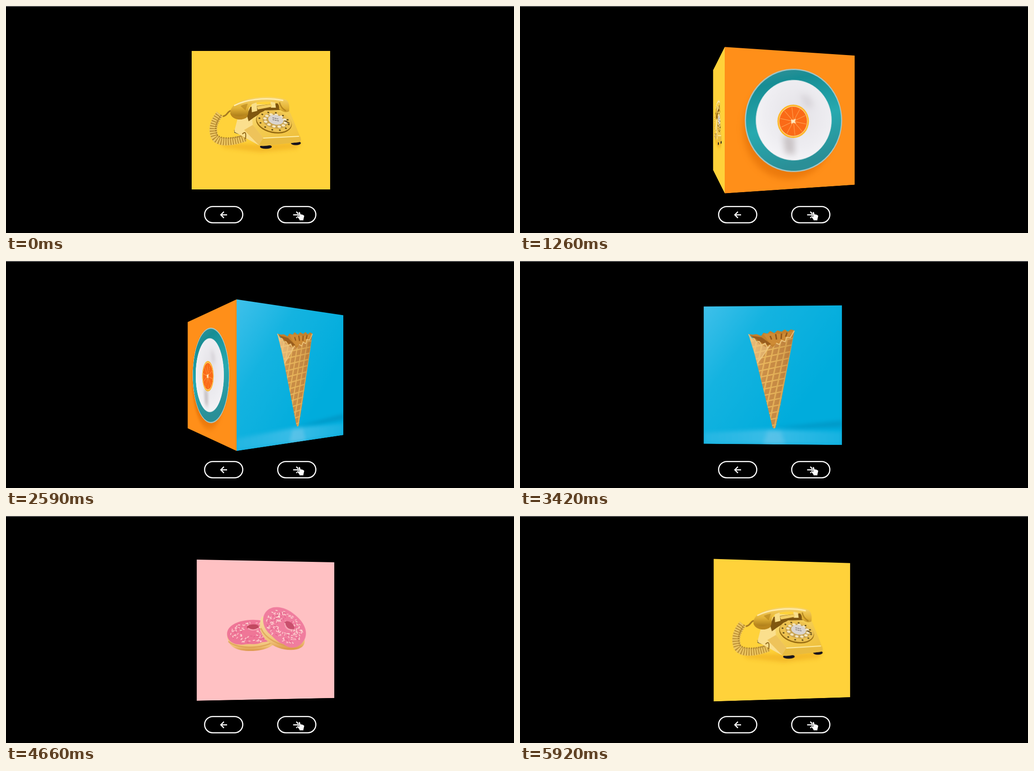
Animation, 1119 px wide and 500 px high, one loop 5.96 s. Source, as an HTML page:

```html
<!DOCTYPE html>
<html lang="en">
<head>
<meta charset="utf-8">
<title>Cube carousel</title>
<style>
  html, body { margin: 0; width: 100%; height: 100%; overflow: hidden; background: #000; }
  .stage { position: absolute; left: 0; top: 0; width: 1119px; height: 500px; overflow: hidden; }
  .topline { position: absolute; left: 0; top: 0; width: 100%; height: 1px; background: #a9a9ab; }
  .scene { position: absolute; left: 408.5px; top: 99px; width: 305px; height: 305px; perspective: 664px; }
  .cube { position: absolute; inset: 0; transform-style: preserve-3d; transform: translateZ(-152.5px); }
  .face { position: absolute; left: 0; top: 0; width: 305px; height: 305px; display: block;
    backface-visibility: hidden; transform: rotateY(calc(var(--i) * 90deg)) translateZ(152.5px); }
  .controls { position: absolute; left: 0; top: 0; }
</style>
</head>
<body>
<div class="stage">
  <div class="topline"></div>
  <div class="scene">
    <div class="cube" id="cube">

      <!-- Telephone -->
      <svg class="face" style="--i:0" viewBox="408.5 99 305 305">
        <defs>
          <linearGradient id="shell" x1="0" y1="0" x2="1" y2="1">
            <stop offset="0" stop-color="#ffe9a0"/><stop offset=".45" stop-color="#f4cd54"/><stop offset="1" stop-color="#eebc36"/>
          </linearGradient>
          <linearGradient id="grip" x1="0" y1="0" x2="0" y2="1">
            <stop offset="0" stop-color="#f9d66b"/><stop offset=".5" stop-color="#e3b235"/><stop offset="1" stop-color="#98690f"/>
          </linearGradient>
          <filter id="soft" x="-30%" y="-80%" width="160%" height="260%"><feGaussianBlur stdDeviation="5"/></filter>
        </defs>
        <rect x="408" y="98" width="306" height="307" fill="#ffd23a"/>
        <path d="M470 302L540 304L650 300L640 314L560 322L480 312Z" fill="#eda91d" opacity=".6" filter="url(#soft)"/>
        <g fill="none">
          <path d="M495 231C487 231 488 242 477 243" stroke="#a77a20" stroke-width="3.5"/>
          <path d="M470 238C456 256 453 272 459 288C468 304 499 300 527 290" stroke="#b4862b" stroke-width="16"/>
          <path d="M470 238C456 256 453 272 459 288C468 304 499 300 527 290" stroke="#edc762" stroke-width="17" stroke-dasharray="3.4 1.8"/>
          <path d="M474 240C461 257 459 271 464 283C472 294 499 292 523 285" stroke="#8f671b" stroke-width="3" stroke-dasharray="2.6 2.6" opacity=".7"/>
        </g>
        <g fill="#17131c">
          <path d="M502 273L514 277V283L503 279Z"/>
          <ellipse cx="572" cy="310" rx="13" ry="4.5"/>
          <ellipse cx="638" cy="302" rx="11" ry="4.5"/>
        </g>
        <path d="M511 243L503 274Q502 278 508 280L557 307Q562 309 570 308L644 300Q650 299 649 292L627 238Q620 222 600 218L545 216Z" fill="url(#shell)"/>
        <path d="M511 243L503 274Q502 278 508 280L557 307L566 290L543 262L540 228Z" fill="#fbdf8d"/>
        <path d="M524 273L557 307L566 290L543 262Z" fill="#e6b13a" opacity=".6"/>
        <path d="M566 291L648 288L649 295Q648 299 644 300L568 308Q562 308 557 306Z" fill="#e9bb3e"/>
        <path d="M566 291L645 287" stroke="#fff0ae" stroke-width="2"/>
        <path d="M520 282Q530 272 527 293" fill="none" stroke="#8a6112" stroke-width="2"/>
        <path d="M530 240L538 222L598 214L606 229L570 230L545 246L534 254Z" fill="#80570f"/>
        <path d="M540 213L551 211L553 231L541 234Z M582 209L592 210L594 224L583 224Z" fill="#f9df8a"/>
        <path d="M552 221L584 216L585 222L554 228Z" fill="#f3ce62"/>
        <g transform="rotate(12 590 254)">
          <ellipse cx="590" cy="256" rx="40" ry="24" fill="#946910"/>
          <ellipse cx="590" cy="254" rx="39" ry="23" fill="#edc250"/>
          <ellipse cx="592" cy="253" rx="28" ry="16" fill="#c9a24d"/>
          <g id="dial"></g>
          <ellipse cx="593" cy="250" rx="17" ry="10.5" fill="#d9d4cf"/>
          <path d="M585 247h13M586 251h15" stroke="#817b78" stroke-width="1.6" stroke-dasharray="4 1"/>
          <path d="M612 248L624 251" stroke="#58431b" stroke-width="2"/>
        </g>
        <path d="M494 238C491 221 510 210 536 204C562 199 592 199 613 205C623 208 625 220 623 232Q613 237 601 227C602 216 598 213 589 212C570 209 551 211 540 217C530 223 536 238 530 245C519 253 499 251 494 238Z" fill="url(#grip)"/>
        <path d="M494 236C505 245 519 244 531 237L529 246C518 253 499 251 494 238Z" fill="#bb871d"/>
        <path d="M503 219C526 207 569 200 609 208" fill="none" stroke="#ffecae" stroke-width="3" stroke-linecap="round"/>
        <path d="M516 220Q525 216 532 215L527 230Z" fill="#ad7b18" opacity=".55"/>
        <path d="M602 212Q604 224 616 231" fill="none" stroke="#a67616" stroke-width="3" opacity=".7"/>
      </svg>

      <!-- Plate with an orange slice -->
      <svg class="face" style="--i:1" viewBox="0 0 305 305">
        <defs>
          <linearGradient id="rim" x1="0" y1="0" x2=".25" y2="1">
            <stop offset="0" stop-color="#3f9399"/><stop offset=".2" stop-color="#168d94"/><stop offset=".6" stop-color="#27a9af"/><stop offset="1" stop-color="#2a8f97"/>
          </linearGradient>
          <radialGradient id="china" cx=".55" cy=".42" r=".6">
            <stop offset="0" stop-color="#e4e2e7"/><stop offset=".7" stop-color="#eeedf1"/><stop offset="1" stop-color="#f5f4f7"/>
          </radialGradient>
          <filter id="blur" x="-40%" y="-40%" width="180%" height="180%"><feGaussianBlur stdDeviation="7"/></filter>
        </defs>
        <rect width="305" height="305" fill="#ff8f19"/>
        <ellipse cx="146" cy="171" rx="107" ry="112" fill="#d86500" opacity=".5" filter="url(#blur)"/>
        <circle cx="157" cy="153" r="113.5" fill="url(#rim)" stroke="#a9c8c9" stroke-width="2.5"/>
        <circle cx="155.5" cy="152.5" r="89" fill="url(#china)" stroke="#cfe3e5" stroke-width="1"/>
        <path d="M127 185L154 190L155 230L132 225Z" fill="#b7afb0" opacity=".65" filter="url(#blur)"/>
        <path d="M166 94L190 98L202 122L180 125Z" fill="#cac5cb" opacity=".5" filter="url(#blur)"/>
        <circle cx="151.5" cy="155" r="37" fill="#ffb21c"/>
        <circle cx="151.5" cy="155" r="34" fill="#ffd98c"/>
        <circle cx="151.5" cy="155" r="32.5" fill="#fa6a17"/>
        <g id="segments" stroke="#ffa14f" stroke-width="1.3"></g>
        <path d="M146 151L151 152L157 149L155 156L158 160L151 158L147 161Z" fill="#ffe7bd"/>
      </svg>

      <!-- Waffle cone -->
      <svg class="face" style="--i:2" viewBox="0 0 305 305">
        <defs>
          <linearGradient id="sky" x1="0" y1="0" x2=".8" y2=".6">
            <stop offset="0" stop-color="#3fc0ea"/><stop offset=".4" stop-color="#14b3e0"/><stop offset="1" stop-color="#00acdc"/>
          </linearGradient>
          <linearGradient id="floor" x1="0" y1="0" x2="1" y2="0">
            <stop offset="0" stop-color="#4cc1ea" stop-opacity=".35"/><stop offset=".5" stop-color="#62c8ef" stop-opacity=".6"/><stop offset="1" stop-color="#4cc1ea" stop-opacity=".3"/>
          </linearGradient>
          <linearGradient id="side" x1="0" y1="0" x2="1" y2="0">
            <stop offset="0" stop-color="#f3ca87" stop-opacity=".6"/><stop offset=".4" stop-color="#e0a252" stop-opacity=".1"/><stop offset="1" stop-color="#94571b" stop-opacity=".35"/>
          </linearGradient>
          <pattern id="waffle" width="13" height="15" patternUnits="userSpaceOnUse" patternTransform="rotate(12) skewY(-24)">
            <rect width="13" height="15" fill="#c68a45"/>
            <path d="M0 1.5H13M1.5 0V15" stroke="#e8b75c" stroke-width="3"/>
          </pattern>
          <filter id="haze" x="-30%" y="-150%" width="160%" height="400%"><feGaussianBlur stdDeviation="4"/></filter>
          <path id="cone" d="M100 62L107 72L113 72L117 79L124 78L129 86L137 82L142 92L148 86L154 91L161 82L168 85L173 76L181 79L184 69L192 70L201 55L194 94L184 145L171 215L160 267Q157 273 153 267L139 209L123 144L113 104Z"/>
        </defs>
        <rect width="305" height="305" fill="url(#sky)"/>
        <path d="M0 280L150 272L305 276V305H0Z" fill="url(#floor)" filter="url(#haze)"/>
        <path d="M142 276H172L181 305H132Z" fill="#80caea" opacity=".4" filter="url(#haze)"/>
        <path d="M157 268L220 261L305 251V266L220 269Z" fill="#007fac" opacity=".4" filter="url(#haze)"/>
        <path id="mouth" d="M100 62L110 63L118 62L128 66L133 59L142 61L148 55L157 60L164 54L173 57L180 52L187 57L193 52L201 54L192 73L173 84L148 93L126 84Z" fill="#c4822c"/>
        <use href="#mouth" fill="url(#waffle)" opacity=".5"/>
        <path d="M133 62L150 60L173 62L199 56L186 70L164 83L150 86Z" fill="#d3913a" opacity=".7"/>
        <path d="M104 65L129 69L150 84L139 87Z" fill="#7d4613" opacity=".6"/>
        <path d="M148 66l3 8M160 62l2 12M173 61l-1 12M185 59l-3 9" stroke="#8f5417" stroke-width="3"/>
        <use href="#cone" fill="url(#waffle)"/>
        <use href="#cone" fill="url(#side)"/>
        <path d="M100 62L107 72L117 79L129 86L142 92L130 114L119 127L113 104Z" fill="#f3cd8b" opacity=".5"/>
        <path d="M100 62L107 72L113 72L117 79L124 78L129 86L137 82L142 92L148 86M148 86L128 115L119 126M161 82L168 85L173 76L181 79L184 69L192 70L201 55" fill="none" stroke="#f0c880" stroke-width="2"/>
      </svg>

      <!-- Two doughnuts -->
      <svg class="face" style="--i:3" viewBox="0 0 305 305">
        <defs>
          <linearGradient id="dough" x1="0" y1="0" x2="0" y2="1">
            <stop offset="0" stop-color="#f7dca2"/><stop offset=".75" stop-color="#f0c277"/><stop offset="1" stop-color="#d99445"/>
          </linearGradient>
        </defs>
        <rect width="305" height="305" fill="#ffc1c3"/>
        <path d="M65 158C64 184 79 197 112 198C147 199 174 188 174 168Z" fill="url(#dough)"/>
        <path d="M68 177C84 193 137 195 168 178" fill="none" stroke="#d89346" stroke-width="3" opacity=".6"/>
        <g transform="translate(118 157) rotate(-3)">
          <path d="M-53 1C-52-18-26-28 4-27C34-26 54-13 54 4C51 20 36 24 23 23C8 30-4 24-18 26C-34 27-54 20-53 1Z" fill="#ef7697"/>
          <g id="leftTop"></g>
          <ellipse cx="4" cy="-11" rx="13" ry="6" fill="#c1485f"/>
          <path d="M-7-9Q4-1 16-8" fill="none" stroke="#f7a1b3" stroke-width="2.5"/>
        </g>
        <path d="M142 122C133 137 135 160 153 176C171 193 197 199 219 195C233 192 238 184 237 174L174 135Z" fill="url(#dough)"/>
        <path d="M139 148C149 171 178 187 213 189" fill="none" stroke="#d99a4e" stroke-width="3" opacity=".65"/>
        <g transform="translate(192 145) rotate(35)">
          <path d="M-53-4C-51-25-25-38 5-35C36-33 55-17 53 5C52 25 35 35 20 33C8 38-8 33-19 32C-37 30-55 15-53-4Z" fill="#f07d9e"/>
          <g id="rightTop"></g>
          <ellipse cx="7" cy="-8" rx="13" ry="8" fill="#c94f6d"/>
          <path d="M-5-7Q6 5 19-5" fill="none" stroke="#f8a6b8" stroke-width="3"/>
        </g>
      </svg>
    </div>
  </div>

  <svg class="controls" width="1119" height="500">
    <g fill="none" stroke="#fff" stroke-width="2.5">
      <rect x="437.5" y="441.7" width="84" height="35.8" rx="17.9"/>
      <rect x="598.5" y="441.7" width="84" height="35.8" rx="17.9"/>
      <path d="M487 460H474M480 453.2L473.2 460L480 466.8M632.5 460H645.5M639.5 453.2L646.3 460L639.5 466.8"/>
    </g>
    <path d="M644.3 454.5Q646 452.2 648 454.6L649.2 459Q651 457.6 652.3 459.4Q654 458.6 655 460.4Q657.3 460.2 657.2 463L656 468L655.2 472.4H646.7L645.5 469.5L641 464.2Q641.5 461.5 645.8 464Z" fill="#fff" stroke="#000" stroke-width=".8"/>
  </svg>
</div>

<script>
  const $ = id => document.getElementById(id);

  function random(seed) {
    return () => (seed = seed * 16807 % 2147483647) / 2147483647;
  }

  function sprinkle(id, rx, ry, count, seed) {
    const rnd = random(seed), colors = ['#ffd9d6', '#ffc6cb', '#fde6da', '#e2608a'];
    let out = '';
    for (let n = 0; n < count; n++) {
      const a = rnd() * Math.PI * 2, r = Math.sqrt(.1 + .8 * rnd()), turn = rnd() * Math.PI;
      const x = rx * r * Math.cos(a), y = ry * r * Math.sin(a);
      out += `<path d="M${x} ${y}l${3.4 * Math.cos(turn)} ${3 * Math.sin(turn)}" stroke="${colors[n % 4]}" stroke-width="1.6" stroke-linecap="round"/>`;
    }
    $(id).innerHTML = out;
  }
  sprinkle('leftTop', 49, 24, 130, 41);
  sprinkle('rightTop', 48, 32, 170, 97);

  let dial = '', spokes = '';
  for (let n = 0; n < 12; n++) {
    const a = n * Math.PI / 6, c = Math.cos(a), s = Math.sin(a);
    dial += `<ellipse cx="${592 + 23 * c}" cy="${252 + 13 * s}" rx="4" ry="2.6" fill="#f3e5bd"/>`
      + `<ellipse cx="${590 + 33 * c}" cy="${254 + 19 * s}" rx="2.2" ry="1.6" fill="#65501c"/>`;
    if (n < 10) {
      const b = n * Math.PI / 5 + .2;
      spokes += `<path d="M151.5 155l${31 * Math.cos(b)} ${31 * Math.sin(b)}"/>`;
    }
  }
  $('dial').innerHTML = dial;
  $('segments').innerHTML = spokes;

  // The CSS "ease" curve, solved for its parameter by bisection.
  function ease(x) {
    if (x >= 1) return 1;
    let lo = 0, hi = 1, u = .5;
    for (let n = 0; n < 24; n++) {
      u = (lo + hi) / 2;
      if (.75 * u * (1 - u) + u ** 3 < x) lo = u; else hi = u;
    }
    return .3 * u * (1 - u) ** 2 + 3 * u * u * (1 - u) + u ** 3;
  }

  const LOOP = 5960, FIRST = 280, TURN = 2000;
  const clicks = [220, 1830, 3245, 4600];

  // Each click retargets the running turn to the next face.
  function angleAt(time) {
    if (time < FIRST) return 0;
    let angle = 0;
    clicks.forEach((start, n) => {
      if (time < start) return;
      const until = Math.min(time, clicks[n + 1] ?? LOOP);
      angle += ((n + 1) * 90 - angle) * ease((until - start) / TURN);
    });
    return angle;
  }

  const cube = $('cube');
  function draw(now) {
    cube.style.transform = `translateZ(-152.5px) rotateY(${-angleAt(now % LOOP)}deg)`;
    requestAnimationFrame(draw);
  }
  requestAnimationFrame(draw);
</script>
</body>
</html>
```
